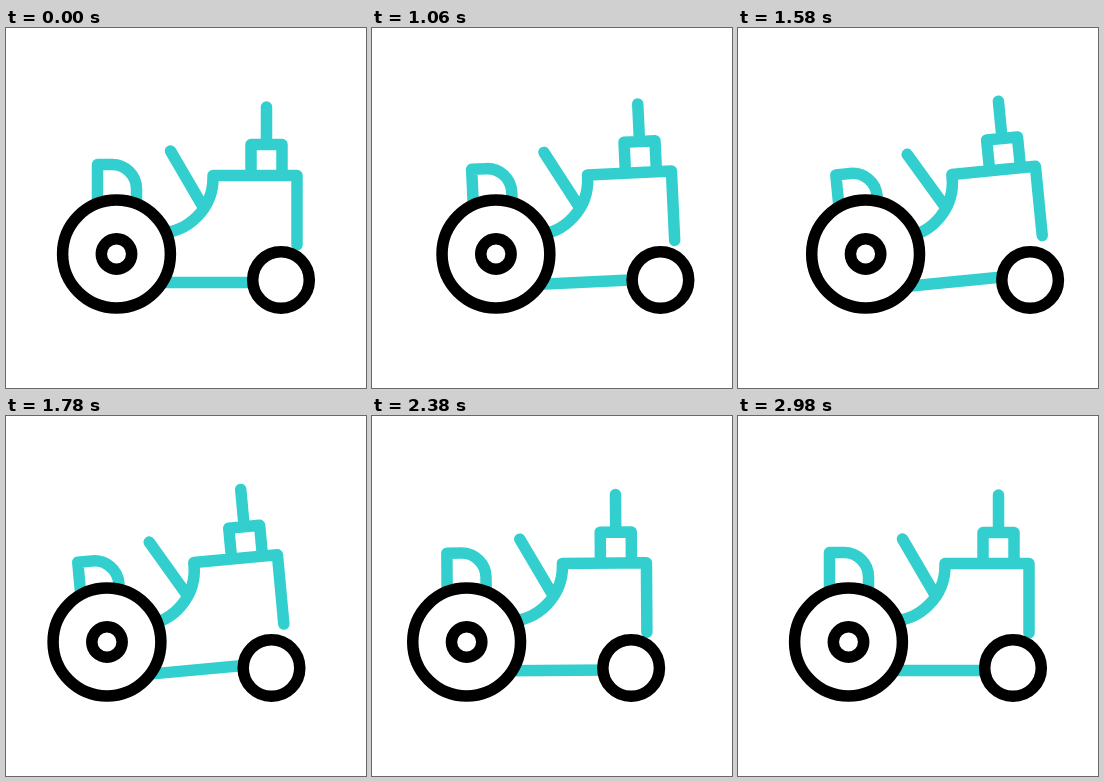
An HTML page with a canvas for the animation above (3000 ms loop, 360 by 360 pixels).

```html
<!DOCTYPE html>
<html lang="en">
<head>
<meta charset="utf-8">
<title>Tractor</title>
<style>
  html, body { margin: 0; width: 100%; height: 100%; overflow: hidden; background: #fff; }
  canvas { display: block; }
</style>
</head>
<body>
<canvas id="stage" width="360" height="360"></canvas>
<script>
const ctx = document.getElementById('stage').getContext('2d');
const LOOP = 3000;
const TEAL = '#33cfce';
const LINE = 11.5;
const PIVOT = { x: 192, y: 252 };

// Keys are [time in ms, value]
const shift = [[740, 0], [1400, 28], [2120, -41], [2573, 0]];
const tilt = [[740, 0], [1400, -5.6], [1660, -5.6], [2520, 0]];

const body = new Path2D([
  'M91.5 178 V136.5 H106 A24.5 24.5 0 0 1 130.5 161 V178', // fender
  'M164.5 123 L196 177',                                   // lever
  'M152 205 A55 55 0 0 0 207 150 V147.5 H291 V217',        // seat and hood
  'M150 254.5 H255',                                       // chassis
  'M245 147 V116.5 H276 V147',                             // exhaust base
  'M260.5 79 V114'                                         // exhaust pipe
].join(' '));

function valueAt(keys, t) {
  if (t <= keys[0][0]) return keys[0][1];
  for (let i = 1; i < keys.length; i++) {
    const [t0, a] = keys[i - 1], [t1, b] = keys[i];
    if (t < t1) {
      const u = (t - t0) / (t1 - t0);
      return a + (b - a) * u * u * (3 - 2 * u);
    }
  }
  return keys[keys.length - 1][1];
}

function ring(x, y, r) {
  ctx.beginPath();
  ctx.arc(x, y, r, 0, Math.PI * 2);
  ctx.fill();
  ctx.stroke();
}

function draw(t) {
  ctx.fillStyle = '#fff';
  ctx.fillRect(0, 0, 360, 360);
  ctx.lineWidth = LINE;
  ctx.lineCap = ctx.lineJoin = 'round';

  ctx.save();
  ctx.translate(valueAt(shift, t), 0);

  ctx.save();
  ctx.translate(PIVOT.x, PIVOT.y);
  ctx.rotate(valueAt(tilt, t) * Math.PI / 180);
  ctx.translate(-PIVOT.x, -PIVOT.y);
  ctx.strokeStyle = TEAL;
  ctx.stroke(body);
  ctx.restore();

  ctx.strokeStyle = '#000';
  ring(110.5, 226, 53.9);
  ring(110.5, 226, 15.2);
  ring(275, 252, 28.3);
  ctx.restore();
}

const start = performance.now();
function tick() {
  draw((performance.now() - start) % LOOP);
  requestAnimationFrame(tick);
}
tick();
</script>
</body>
</html>
```
